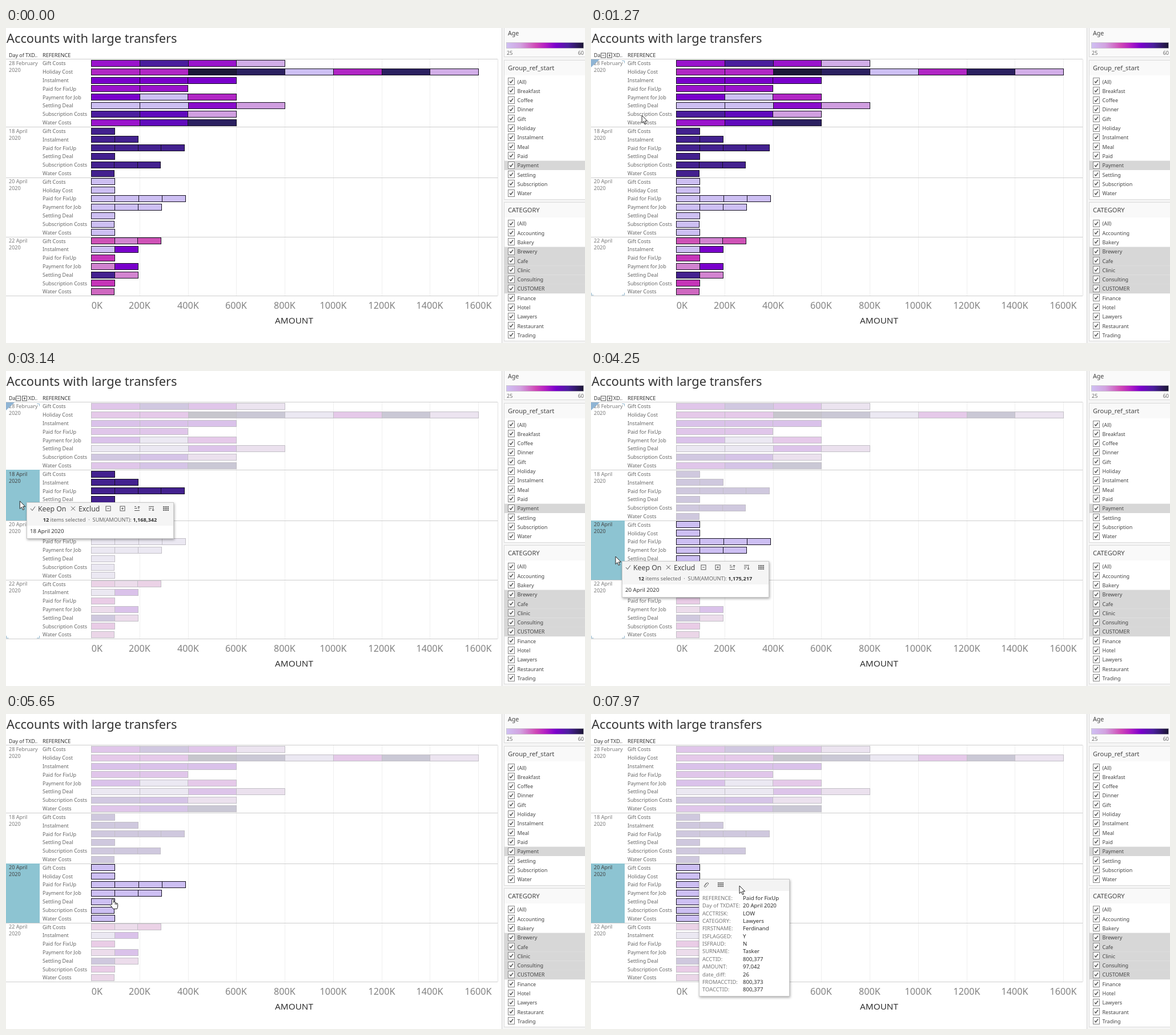
An HTML page that plays this animation: 1014x552 px, repeating every 8 s.

```html
<!DOCTYPE html>
<html lang="en">
<head>
<meta charset="utf-8">
<title>Accounts with large transfers</title>
<style>
  html, body { margin: 0; width: 100%; height: 100%; overflow: hidden; background: #fff; }
  svg { display: block; width: 100%; height: 100%; font: 9px "Noto Sans", sans-serif; fill: #666; }
  .dark { fill: #333; }
  .value { fill: #2c2c2c; font-weight: 500; }
  .icon { fill: none; stroke: #555; }
  .card { filter: drop-shadow(1px 2px 2px #0005); }
</style>
</head>
<body>
<svg id="stage" viewBox="0 0 1014 552"></svg>
<script>
const LOOP = 8000;
const LEFT = 149, UNIT = 84.75, TOP = 62, PITCH = 14.82;

const COLORS = {
  a: '#9a14cc', b: '#4b1e9e', c: '#d2aee8', d: '#1c1838', e: '#2b2060', f: '#cdbff3',
  g: '#b026c4', h: '#7a00cc', i: '#8a0ccc', j: '#600abc', k: '#d09ee0', l: '#43218f',
  m: '#cf52b6', n: '#d284d0', p: '#c535b8', q: '#cf68c0'
};

// Each row: label, one colour letter per segment, right end of the bar.
const DAYS = [
  { name: '28 February', count: 30, sum: '6,000,294', popup: [47, 145], rows: [
    ['Gift Costs', 'abac', 488], ['Holiday Cost', 'ggdefgec', 827], ['Instalment', 'hhh', 403],
    ['Paid for FixUp', 'aa', 318], ['Payment for Job', 'hfg', 403], ['Settling Deal', 'ffik', 488],
    ['Subscription Costs', 'bjk', 403], ['Water Costs', 'aje', 403]] },
  { name: '18 April', count: 12, sum: '1,168,342', popup: [36, 230], rows: [
    ['Gift Costs', 'l', 190], ['Instalment', 'll', 231], ['Paid for FixUp', 'llll', 312],
    ['Settling Deal', 'l', 190], ['Subscription Costs', 'lll', 270], ['Water Costs', 'l', 189]] },
  { name: '20 April', count: 12, sum: '1,175,217', popup: [54, 333], rows: [
    ['Gift Costs', 'f', 190], ['Holiday Cost', 'f', 190], ['Paid for FixUp', 'ffff', 314],
    ['Payment for Job', 'fff', 272], ['Settling Deal', 'f', 190], ['Subscription Costs', 'f', 189],
    ['Water Costs', 'f', 190]] },
  { name: '22 April', rows: [
    ['Gift Costs', 'mnm', 271], ['Instalment', 'fh', 231], ['Paid for FixUp', 'p', 190],
    ['Payment for Job', 'nh', 231], ['Settling Deal', 'ln', 231], ['Subscription Costs', 'p', 190],
    ['Water Costs', 'q', 189]] }
];

const FIELDS = ['REFERENCE', 'Day of TXDATE', 'ACCTRISK', 'CATEGORY', 'FIRSTNAME', 'ISFLAGGED', 'ISFRAUD',
  'SURNAME', 'ACCTID', 'AMOUNT', 'date_diff', 'FROMACCTID', 'TOACCTID'];
const FIRST_TIP = ['Gift Costs', '18 April 2020', 'LOW', 'Accounting', 'Ned', 'Y', 'N', 'Brill',
  '800,373', '97,996', '54', '500,102', '800,373'];
const SECOND_TIP = ['Paid for FixUp', '20 April 2020', 'LOW', 'Lawyers', 'Ferdinand', 'Y', 'N', 'Tasker',
  '800,377', '97,042', '26', '800,373', '800,377'];

const rect = (x, y, w, h, fill, more = '') =>
  `<rect x="${x}" y="${y}" width="${w}" height="${h}" fill="${fill}" ${more}/>`;
const text = (x, y, str, size = 9, more = '') =>
  `<text x="${x}" y="${y}" font-size="${size}" ${more}>${str}</text>`;
const path = (d, more = 'class="icon"') => `<path d="${d}" ${more}/>`;
const group = (id, body, more = '') => `<g id="${id}" ${more}>${body}</g>`;
const at = (x, y, body) => `<g transform="translate(${x} ${y})">${body}</g>`;
const dimmed = hex => '#' + [1, 3, 5].map(i =>
  Math.round(parseInt(hex.slice(i, i + 2), 16) * 0.2 + 242 * 0.8).toString(16).padStart(2, '0')).join('');

function bars(day, tone, stroke) {
  return day.rows.map(([, letters, end], r) => {
    const y = Math.round(TOP + PITCH * (day.first + r)) - 5.5;
    const w = (end - LEFT) / letters.length;
    return [...letters].map((c, k) => {
      const x = Math.round(LEFT + k * w);
      return rect(x + 0.5, y, Math.round(LEFT + (k + 1) * w) - x, 11, tone(COLORS[c]), `stroke="${stroke}"`);
    }).join('');
  }).join('');
}

function chart() {
  let out = text(1, 26, 'Accounts with large transfers', 21.8, 'class="dark"')
    + text(5, 51, 'Day of TXD..', 8.9, 'class="dark"') + text(64, 51, 'REFERENCE', 9.2, 'class="dark"');
  for (let k = 0; k <= 8; k++) {
    const x = Math.round(LEFT + k * UNIT);
    out += path(`M${x + 0.5} 55V469`, 'stroke="#efefef"');
    out += text(k ? x : 159.5, 492, `${k * 200}K`, 16.2, 'text-anchor="middle" fill="#828282"');
  }
  out += path('M861.5 55V469', 'stroke="#e2e2e2"') + text(504.5, 518, 'AMOUNT', 15.3, 'class="dark" text-anchor="middle"');
  let first = 0;
  DAYS.forEach((day, i) => {
    day.first = first;
    first += day.rows.length;
    const mid = TOP + PITCH * day.first;
    const top = Math.round(mid - 7.5), bottom = Math.round(mid + PITCH * day.rows.length - 7.5);
    out += group('head' + i, rect(0, top, 59, bottom - top, '#8dc4d2'))
      + group('date' + i, text(5, mid + 3, day.name) + text(5, mid + 15, '2020'), 'fill="#787878"')
      + day.rows.map((row, r) => text(64, mid + PITCH * r + 3.3, row[0])).join('')
      + group('bright' + i, bars(day, c => c, '#151020'))
      + group('dim' + i, bars(day, dimmed, '#c2bfc6'))
      + path(`M0 ${bottom + 0.5}H861`, 'stroke="#cdcdcd"');
  });
  return out + path('M0 54.5H861', 'stroke="#cdcdcd"');
}

function filter(title, top, bottom, firstY, names, marked) {
  return rect(872.5, top + 0.5, 145, bottom - top, '#fff', 'stroke="#dadada"')
    + rect(873, top + 1, 142, 26, '#f9f9f9')
    + text(879, top + 18, title, 11.1, 'fill="#444"')
    + names.split(' ').map((name, i) => {
      const y = firstY + i * 16.3, box = Math.round(y) - 6.5;
      return (marked.includes(name) ? rect(873, y - 8.1, 141, 16.4, '#d7d7d7') : '')
        + rect(879.5, box, 11, 12, '#fff', 'stroke="#858585"')
        + path(`M882 ${box + 6}l2 2.5 4-5.5`, 'class="icon" stroke-width="1.4"')
        + text(895.5, y + 3.5, name, 9, 'fill="#444"');
    }).join('');
}

function panel() {
  const stops = ['0 #cfc0f3', '.18 #d2a2e0', '.38 #cf48b6', '.5 #b41fc4', '.64 #7a00cc', '.8 #4b1e9e', '1 #1a1633'];
  return `<linearGradient id="ages">${stops.map(s => {
    const [offset, color] = s.split(' ');
    return `<stop offset="${offset}" stop-color="${color}"/>`;
  }).join('')}</linearGradient>`
    + rect(868, 0, 146, 552, '#f5f5f5') + path('M868.5 0V552', 'stroke="#d2d2d2"')
    + rect(872.5, -1, 145, 51.5, '#fafafa', 'stroke="#dadada"')
    + text(879, 13, 'Age', 10.6, 'fill="#444"')
    + rect(876.5, 25.5, 135, 10, 'url(#ages)', 'stroke="#bbb" stroke-width=".6"')
    + text(877, 47, '25') + text(1012, 47, '60', 9, 'text-anchor="end"')
    + filter('Group_ref_start', 56, 300, 94,
      '(All) Breakfast Coffee Dinner Gift Holiday Instalment Meal Paid Payment Settling Subscription Water', ['Payment'])
    + filter('CATEGORY', 305, 548, 342.8,
      '(All) Accounting Bakery Brewery Cafe Clinic Consulting CUSTOMER Finance Hotel Lawyers Restaurant Trading',
      ['Brewery', 'Cafe', 'Clinic', 'Consulting', 'CUSTOMER']);
}

const boxIcon = (x, y, plus) => rect(x - 4, y - 4, 8, 8, '#fff', 'stroke="#555"')
  + path(`M${x - 2} ${y}h4${plus ? `M${x} ${y - 2}v4` : ''}`);
const tableIcon = (x, y) => path([0, 2.7, 5.4, 8.1].map(d => `M${x - 4 + d} ${y - 4}v8`).join(''),
  'class="icon" stroke-width="1.7" stroke-dasharray="2.2 .7"');

function popup(day, i) {
  const body = rect(0.5, 0.5, 257, 63, '#fff', 'class="card" stroke="#c9c9c9"') + rect(1, 1, 256, 40, '#f5f5f5')
    + path('M7 11l3 3.5 5-7') + text(20, 16, 'Keep On', 12.3, 'fill="#444"')
    + path('M78 7.5l7 7M85 7.5l-7 7') + text(91, 16, 'Exclud', 12.3, 'fill="#444"')
    + boxIcon(143, 11) + boxIcon(168, 11, true)
    + path('M189 7.5h3M189 10.5h5M189 14.5h9M196.500 12V7l-2 2m2-2l2 2')
    + path('M214 7.500h9M214 10.500h5M214 13.500h3M221.500 9v6l-2-2m2 2l2-2') + tableIcon(244, 11)
    + text(128.500, 33.500, `<tspan font-weight="600" fill="#333">${day.count}</tspan> items selected &#160;·&#160; SUM(AMOUNT): `
      + `<tspan font-weight="600" fill="#333">${day.sum}</tspan>`, 9.2, 'text-anchor="middle"')
    + text(6, 54, day.name + ' 2020', 9.7, 'class="dark"');
  return group('popup' + i, at(...day.popup, body));
}

function tooltip(id, x, y, w, values, toolbar) {
  const lift = toolbar ? 21 : 0;
  const body = rect(0.5, 0.5 - lift, w - 1, 184 + lift, '#fff', 'class="card" stroke="#c9c9c9"')
    + (toolbar ? rect(1, 1 - lift, w - 2, 20, '#f3f3f3') + tableIcon(38, -11)
      + path('M10 -9l4-5q2-1 3 1l-5 6q-2 1-3-1l4-6', 'class="icon" stroke-width=".9"') : '')
    + FIELDS.map((field, i) => text(6, 16 + i * 13.35, field + ':', 9.4, 'fill="#777"')
      + text(77, 16 + i * 13.35, values[i], 9.6, 'class="value"')).join('');
  return group(id, at(x, y, body));
}

const hover = rect(16, 43, 22, 10.8, '#fff') + boxIcon(21.5, 48) + boxIcon(32.5, 48, true)
  + path('M0 55H15L0 69Z', 'fill="#8fb4d4"')
  + path('M54 57.500h4.500v4M.500 464v4h4M54 468h4.500v-4', 'fill="none" stroke="#8fb4cc"');
const arrow = path('M0 0V13.500L3.200 10.600 5.300 15.500 7.500 14.600 5.400 9.800H9.600Z', 'fill="#fff" stroke="#222"');
const hand = path('M-1.500 9V.500Q-1.500-1 0-1T1.500.500V5.500Q3-.0 4.300 6 5.800 5 6.600 6.800 8.500 6 8.700 8.500V12Q8.500 14 7.500 16.500H.500'
  + 'Q-1 13.500-4.500 9.800-4.500 7.500-1.500 9M4.300 6V9M6.600 6.800V9.500', 'fill="#fff" stroke="#222"');

const stage = document.getElementById('stage');
stage.innerHTML = chart() + panel() + group('hover', hover)
  + DAYS.slice(0, 3).map(popup).join('')
  + tooltip('tip1', 178, 198, 148, FIRST_TIP)
  + tooltip('tip2', 189, 313, 159, SECOND_TIP)
  + tooltip('tip3', 189, 310, 159, SECOND_TIP, true)
  + group('cursor', group('arrow', arrow) + group('hand', hand));

const $ = id => document.getElementById(id);
const fade = (id, opacity) => { $(id).style.opacity = opacity; };
const show = (id, on) => { $(id).style.display = on ? '' : 'none'; };

// Pointer moves: first step, last step, number of steps, end point.
const MOVES = [
  [400, 620, 3, 164, 184], [830, 1500, 7, 33, 130], [2040, 2600, 6, 22, 215],
  [3140, 3920, 8, 40, 318], [4250, 5000, 8, 64, 374], [5110, 5650, 6, 187, 325],
  [5760, 5870, 2, 184, 318], [5990, 6210, 3, 174, 298], [7210, 7970, 8, 260, 301]
];
const SELECTIONS = [[1500, 0], [2820, 1], [3920, 2]];
// Overlays: appear, start to leave, time to fade out.
const OVERLAYS = {
  hover: [1170, 4800, 0], tip1: [620, 830, 110], tip2: [6210, 7320, 0], tip3: [7320, LOOP, 0],
  popup0: [1500, 2260, 220], popup1: [2820, 3250, 220], popup2: [3920, 5110, 220]
};

function pointer(t) {
  let x = 600, y = 560;
  for (const [start, end, n, toX, toY] of MOVES) {
    if (t < start) break;
    const step = Math.floor((t - start) / (end - start) * (n - 1) + 1e-6);
    const p = Math.min(1, (step + 1) / n);
    x += (toX - x) * p;
    y += (toY - y) * p;
  }
  return [x, y];
}

function render(t) {
  const selected = SELECTIONS.reduce((day, [time, next]) => t >= time ? next : day, -1);
  DAYS.forEach((_, i) => {
    const bright = selected < 0 || selected === i;
    show('bright' + i, bright);
    show('dim' + i, !bright);
    show('head' + i, selected === i);
    $('date' + i).setAttribute('fill', selected === i ? '#444' : '#787878');
  });
  for (const [id, [on, off, length]] of Object.entries(OVERLAYS)) {
    const visible = t >= on && t < off + length;
    show(id, visible);
    if (visible) fade(id, t < off ? 1 : 1 - (t - off) / length);
  }
  const [x, y] = pointer(t);
  const overMark = (t >= 620 && t < 940) || (t >= 5540 && t < 7320);
  $('cursor').setAttribute('transform', `translate(${x} ${y})`);
  show('cursor', t >= 400);
  show('hand', overMark);
  show('arrow', !overMark);
}

const begin = performance.now();
function tick() {
  render((performance.now() - begin) % LOOP);
  requestAnimationFrame(tick);
}
tick();
</script>
</body>
</html>
```
